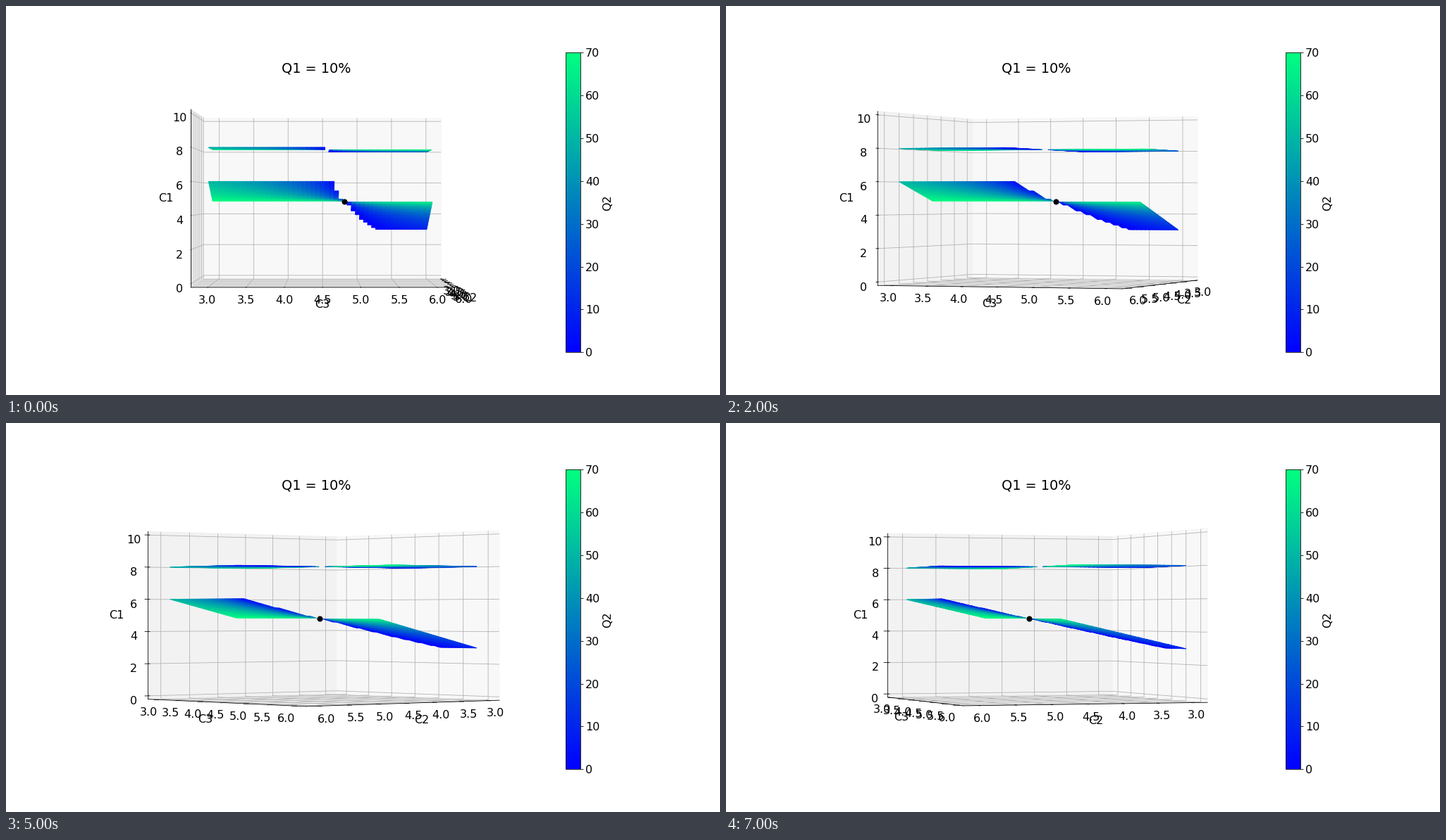
Recreate the animation shown at these times as a matplotlib script. Size 1013 by 553 pixels, loop 8000 ms.

```python
import numpy as np
import matplotlib.pyplot as plt
from matplotlib.animation import FuncAnimation
from matplotlib.cm import ScalarMappable
from matplotlib.colors import Normalize
from mpl_toolkits.mplot3d.art3d import Poly3DCollection

DPI = 72
WIDTH, HEIGHT = 1013, 553
FRAMES, INTERVAL = 8, 1000
DEGREES_PER_FRAME = 10
TINY = 0.001            # keeps floor and left wall chosen in edge-on views

Q1, Q_TOTAL, MEAN = 0.1, 0.8, 4.8
GRID = np.linspace(3, 6, 50)

plt.rcParams.update({"font.family": "DejaVu Sans", "font.size": 16})
fig = plt.figure(figsize=(WIDTH / DPI, HEIGHT / DPI), dpi=DPI)
ax = fig.add_subplot(projection="3d", computed_zorder=False)
ax.apply_aspect = lambda position=None: None    # fill the wide slot
color_map = ScalarMappable(Normalize(0, 70), "winter")


def second_share(c1, c2, c3):
    """Percentage Q2 that gives the harmonic mean; NaN where impossible."""
    with np.errstate(divide="ignore", invalid="ignore"):
        q2 = (Q_TOTAL / MEAN - Q1 / c1 - (Q_TOTAL - Q1) / c3) / (1 / c2 - 1 / c3)
    possible = (q2 >= 0) & (q2 <= Q_TOTAL - Q1)
    return np.where(possible, 100 * q2, np.nan)


def add_surface(c1_of_c2):
    c2, c3 = np.meshgrid(GRID, GRID, indexing="ij")
    c1 = c1_of_c2(c2)
    q2 = second_share(c1, c2, c3)
    points = np.stack([c2, c3, c1], axis=-1)
    faces, values = [], []
    for i in range(len(GRID) - 1):
        for j in range(len(GRID) - 1):
            if np.isnan(q2[i:i + 2, j:j + 2]).any():
                continue
            faces.append([points[i, j], points[i + 1, j],
                          points[i + 1, j + 1], points[i, j + 1]])
            values.append(q2[i, j])
    colors = color_map.to_rgba(np.array(values))
    ax.add_collection3d(Poly3DCollection(
        faces, facecolors=colors, edgecolors=colors, linewidths=1, zorder=1))


def padded(low, high):
    margin = (high - low) / 48
    return low - margin, high + margin


add_surface(lambda c2: c2)
add_surface(lambda c2: np.full_like(c2, 8.0))
ax.scatter([MEAN], [MEAN], [MEAN], color="black", s=50, linewidths=1,
           depthshade=False, zorder=3)

ax.set_xlabel("C2")
ax.set_ylabel("C3")
ax.set_zlabel("C1")
ax.set_xticks(np.arange(3, 6.1, 0.5))
ax.set_yticks(np.arange(3, 6.1, 0.5))
ax.set_zticks(np.arange(0, 11, 2))
ax.set_xlim(*padded(2.85, 6.15))
ax.set_ylim(*padded(2.85, 6.15))
ax.set_zlim(*padded(0, 10))
ax.set_box_aspect((1, 1, 1), zoom=np.sqrt(3) / 1.8294640721620434)  # unit cube
ax.set_title("Q1 = 10%", y=1)
ax.title.set_y(0.92)
fig.colorbar(color_map, ax=ax, label="Q2")


def update(frame):
    ax.view_init(elev=TINY, azim=DEGREES_PER_FRAME * frame + TINY)
    return []


anim = FuncAnimation(fig, update, frames=FRAMES, interval=INTERVAL,
                     repeat=True, repeat_delay=0)
plt.show()
```
